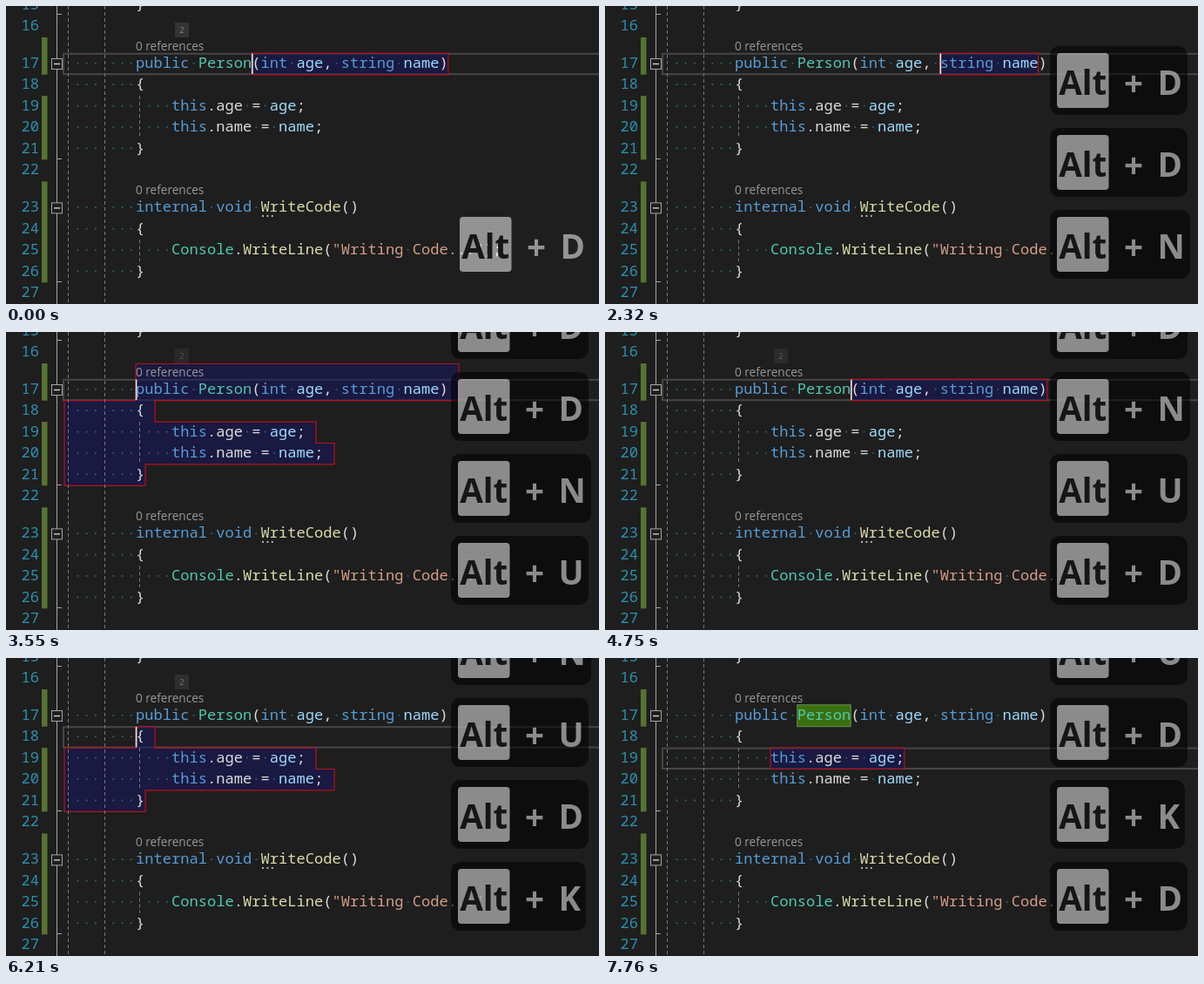
These frames come from a looping animation (681x342 px, 8000 ms). An HTML page:

```html
<!DOCTYPE html>
<html lang="en">
<head>
<meta charset="utf-8">
<title>Code selection</title>
<style>
html, body { margin: 0; width: 100%; height: 100%; overflow: hidden; background: #1e1e1e; }
svg { display: block; }
text { white-space: pre; }
.code { font: 17.083px "Noto Sans Mono", "DejaVu Sans Mono", monospace; fill: #dcdcdc; }
.n { fill: #2b91af; }
.k { fill: #569cd6; }
.t { fill: #4ec9b0; }
.p { fill: #9cdcfe; }
.m { fill: #dcdcaa; }
.s { fill: #d69d85; }
.lens { font: 13.6px "Open Sans", "Noto Sans", sans-serif; fill: #999; }
.badge { font: 9.5px "Open Sans", "Noto Sans", sans-serif; fill: #888; text-anchor: middle; }
.key { font: bold 38.5px "Open Sans", "Noto Sans", sans-serif; }
</style>
</head>
<body>
<svg width="681" height="342" viewBox="0 0 681 342">
  <rect width="681" height="342" fill="#1e1e1e"/>
  <g id="back"></g>
  <g id="code"></g>
  <g id="front"></g>
</svg>
<script>
(() => {
const LOOP = 8000, LEFT = 67, CW = 10.25, LH = 24.4;
const $ = id => document.getElementById(id);
const colX = c => LEFT + c * CW;
const rowY = n => 54.3 + LH * (n - 17) + (n > 22 ? 19 : 0) - (n < 17 ? 18.6 : 0);
const rect = (x, y, w, h, attrs) => `<rect x="${x}" y="${y}" width="${w}" height="${h}" ${attrs}/>`;
const text = (x, y, cls, str, attrs = '') => `<text x="${x}" y="${y}" class="${cls}" ${attrs}>${str}</text>`;
const path = (d, attrs) => `<path d="${d}" fill="none" ${attrs}/>`;

// Line number, indent, then tokens: a colour class letter followed by the text.
const LINES = [
  [15, 8, 'o}'],
  [17, 8, 'kpublic |tPerson|o(|kint |page|o, |kstring |pname|o)'],
  [18, 8, 'o{'],
  [19, 12, 'kthis|o.age = |page|o;'],
  [20, 12, 'kthis|o.name = |pname|o;'],
  [21, 8, 'o}'],
  [23, 8, 'kinternal |kvoid |mWriteCode|o()'],
  [24, 8, 'o{'],
  [25, 12, 'tConsole|o.|mWriteLine|o(|s"Writing Code..."|o);'],
  [26, 8, 'o}']
];

function drawCode() {
  let out = '';
  const dot = (c, n) => `<circle cx="${colX(c + .5)}" cy="${rowY(n) + 11.5}" r="1.1" fill="#2b5d6b"/>`;

  for (const [a, b] of [[17, 17], [19, 21], [23, 26]]) {
    const y = rowY(a) - (a === 19 ? 0 : 18.3);
    out += rect(41, y, 6.5, rowY(b) + LH - y, 'fill="#577430"');
  }
  out += path('M58.5 0V342M58.5 9.5H64M58.5 175.5H64M58.5 316.5H64', 'stroke="#a5a5a5"');
  for (const n of [17, 23]) {
    const y = rowY(n) + 6.2;
    out += rect(52.5, y, 12, 12, 'fill="#1e1e1e" stroke="#a5a5a5"') +
      path(`M55 ${y + 6}H62`, 'stroke="#dcdcdc" stroke-width="1.3"');
  }
  const guide = 'stroke="#777" stroke-dasharray="4 3"';
  out += path('M71.5 0V342M113.5 0V342', guide) +
    path(`M153.5 ${rowY(19)}V${rowY(21)}M153.5 ${rowY(25)}V${rowY(26)}`, guide);

  for (let n = 15; n <= 27; n++) out += text(17.5, rowY(n) + 16.7, 'code n', n);
  for (const [n, indent, src] of LINES) {
    for (let c = 0; c < indent; c++) if (c % 4) out += dot(c, n);
    let col = indent;
    for (const token of src.split('|')) {
      const str = token.slice(1);
      out += text(colX(col), rowY(n) + 16.7, 'code ' + token[0], str);
      [...str].forEach((ch, i) => { if (ch === ' ') out += dot(col + i, n); });
      col += str.length;
    }
  }
  for (const n of [17, 23]) out += text(149, rowY(n) - 3.4, 'lens', '0 references');
  for (let i = 0; i < 3; i++) out += rect(294 + i * 5.4, 240, 2, 2, 'fill="#b0b0b0"');
  $('code').innerHTML = out;
}

const box = (c0, c1, n) => `M${colX(c0)} ${rowY(n)}H${colX(c1)}V${rowY(n) + LH}H${colX(c0)}Z`;
const body = `H171V${rowY(19)}H356V${rowY(20)}H377V${rowY(21)}H160V${rowY(22)}H67`;
const PARAMS = box(21, 43, 17);

// Each key press: time, letter, caret line and column, selection outline.
const STEPS = [
  [0, 'D', 17, 21, PARAMS],
  [980, 'D', 17, 22, box(22, 29, 17)],
  [2320, 'N', 17, 31, box(31, 42, 17)],
  [3310, 'U', 17, 8, `M149 36.5H520V${rowY(18)}${body}V${rowY(18)}H149Z`],
  [4750, 'D', 17, 21, PARAMS],
  [6210, 'K', 18, 8, `M149 ${rowY(18)}${body}V${rowY(19)}H149Z`],
  [7400, 'D', 19, 12, box(12, 27, 19)]
];

// Value of the last [time, value] pair that has begun.
const at = (t, pairs) => pairs.reduce((v, [start, value]) => t >= start ? value : v, 0);
const within = (t, ...spans) => spans.some(([a, b]) => t >= a && t < b);

const BADGE = [[0, 1], [150, .5], [270, 0], [1100, 1], [1250, .5], [1370, 0], [3310, 1], [3550, .5],
  [3670, 0], [4600, 1], [4750, .6], [4870, .3], [4990, 0], [6210, .8], [6330, 0], [7400, 1], [7520, .5], [7640, 0]];
const CARET_OFF = [[550, 980], [1520, 1920], [2750, 3310], [4070, 4600], [5270, 5700], [6700, 7130], [7760, LOOP]];
const OLDEST = [[0, 1], [5700, .6], [5820, .3], [5940, 0], [6210, 1], [7130, .5], [7250, 0], [7400, 1]];
const LETTER_W = { D: 158, N: 161, U: 158, K: 155 };

function keyPanel(letter, y, dx, boxed, alpha) {
  const grey = 'fill="#fff" fill-opacity=".52"';
  return `<g transform="translate(${511 + dx} ${y})" opacity="${alpha}">` +
    (boxed ? rect(0, 0, LETTER_W[letter], 79, 'rx="11" fill="#000" fill-opacity=".55"') : '') +
    rect(8, 8, 59.5, 63, `rx="4" ${grey}`) +
    text(37.7, 56, 'key', 'Alt', 'text-anchor="middle" fill="#0c0c0c" fill-opacity=".92"') +
    text(96, 57, 'key', '+', `text-anchor="middle" ${grey}`) +
    text(123.5, 56, 'key', letter, grey) + '</g>';
}

function backLayer(t, [, , line, , selection]) {
  let out = rect(66, rowY(line) + .5, 700, LH - 1, 'fill="none" stroke="#464646" stroke-width="2"');
  const brace = (c, n) => rect(colX(c), rowY(n), CW, LH, 'fill="#0e4583"');
  const refs = (c, len) =>
    rect(colX(c), rowY(17) - .5, len * CW, LH + .5, 'fill="#3a7010" stroke="#6a8f4a"');
  if (within(t, [270, 1100], [4870, 6210])) out += brace(21, 17) + brace(42, 17);
  if (within(t, [6330, 7520])) out += brace(8, 18) + brace(8, 21);
  if (within(t, [1370, 2320])) out += refs(22, 3);
  if (within(t, [2750, 3310])) out += refs(31, 6);
  if (within(t, [7760, LOOP])) out += refs(15, 6);
  return out + `<path d="${selection}" fill="#141464" fill-opacity=".5" stroke="#b8101c" stroke-width="1.2"/>`;
}

function frontLayer(t, index) {
  const [, , line, col] = STEPS[index];
  let out = '';
  if (!within(t, ...CARET_OFF)) out += rect(colX(col) - .2, rowY(line) + .3, 1.6, LH - 1, 'fill="#e6e6e6"');
  const badge = at(t, BADGE);
  if (badge) {
    out += `<g opacity="${badge}">` + rect(194, 19, 16, 17, 'fill="#343434"') +
      text(202, 31, 'badge', '2') + '</g>';
  }
  const early = t < 2320;
  for (let i = Math.max(0, index - 3); i <= index; i++) {
    const age = index - i;
    out += keyPanel(STEPS[i][1], 234 - 94 * age, early ? 2 : 0, !early || age > 0, age === 3 ? at(t, OLDEST) : 1);
  }
  return out;
}

const shown = {};
function put(id, html) {
  if (shown[id] !== html) $(id).innerHTML = shown[id] = html;
}

function render(t) {
  const index = STEPS.filter(step => step[0] <= t).length - 1;
  put('back', backLayer(t, STEPS[index]));
  put('front', frontLayer(t, index));
}

const begin = performance.now();
function tick() {
  render(Math.max(0, performance.now() - begin) % LOOP);
  requestAnimationFrame(tick);
}
drawCode();
tick();
})();
</script>
</body>
</html>
```
